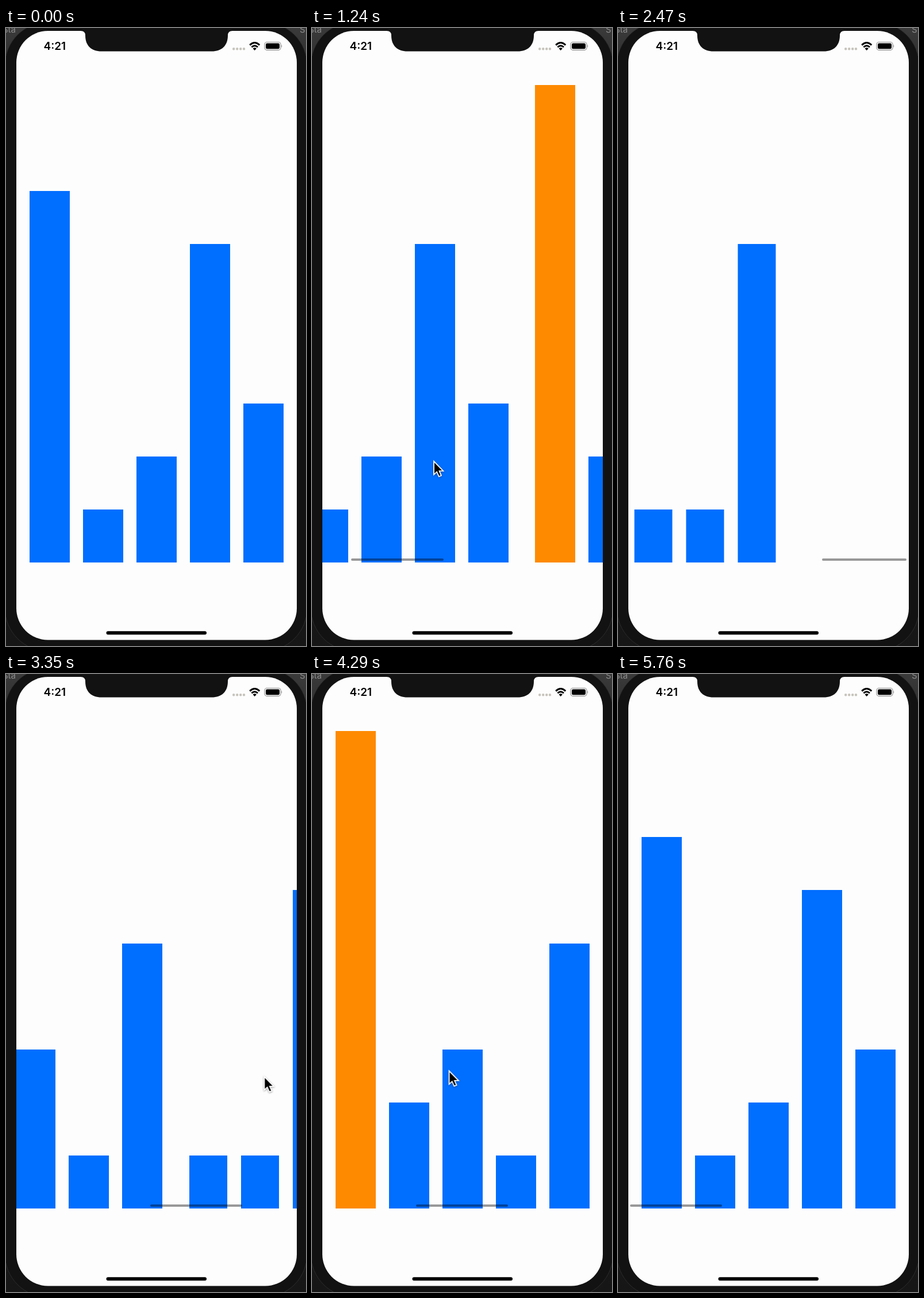
An HTML page that plays this animation: 522 by 1073 pixels, repeating every 5810 ms.

```html
<!DOCTYPE html>
<html lang="en">
<head>
<meta charset="utf-8">
<title>Paged bar chart</title>
<style>
@property --scroll { syntax: "<number>"; inherits: true; initial-value: 0; }

html, body { margin: 0; width: 100%; height: 100%; overflow: hidden; background: #151515; }

.stage {
  position: relative; width: 522px; height: 1073px; overflow: hidden;
  animation: scroll 5810ms linear infinite;
}
.phone { position: absolute; inset: 0; }

.chart { position: absolute; left: 18px; top: 60px; width: 488px; height: 868px; overflow: hidden; }
.pages { display: flex; height: 100%; transform: translateX(calc(var(--scroll) * -1px)); }
.page {
  flex: none; box-sizing: border-box; width: 488px; padding-left: 23px;
  display: flex; align-items: flex-end; gap: 23.5px; --w: 69.5px;
}
.page.short { padding-left: 24px; --w: 66.3px; }
.bar { flex: none; width: var(--w); height: calc(var(--v) * 92.1px); background: #006eff; }
.bar.top { background: #fe8a00; }

.thumb {
  --over: max(0, var(--scroll) - 976);
  position: absolute; top: 920.5px; height: 4px; border-radius: 2px; background: #0006;
  left: calc((21.3 + min(var(--scroll), 976) * .3282 + var(--over)) * 1px);
  width: calc((160.5 - var(--over)) * 1px);
  animation: thumb 5810ms linear infinite;
}
.cursor {
  position: absolute; left: 0; top: 0; overflow: visible;
  filter: drop-shadow(0 1px 1.5px #0006);
  animation: cursor 5810ms ease-in-out infinite;
}

@keyframes scroll {
  0%, 18.24% { --scroll: 0; animation-timing-function: ease-in; }
  22.38% { --scroll: 225; animation-timing-function: cubic-bezier(.2, .6, .3, 1); }
  30.64%, 32.36% { --scroll: 488; animation-timing-function: ease-in; }
  37.52% { --scroll: 830; animation-timing-function: cubic-bezier(.2, .5, .5, 1); }
  42.513% { --scroll: 989.5; animation-timing-function: ease-in-out; }
  48.19%, 52.5% { --scroll: 976; animation-timing-function: ease-in; }
  57.659% { --scroll: 700; }
  58.86% { --scroll: 630; animation-timing-function: cubic-bezier(.2, .6, .3, 1); }
  68.85%, 78.49% { --scroll: 488; animation-timing-function: ease-in-out; }
  84.34% { --scroll: 240; animation-timing-function: cubic-bezier(.2, .6, .3, 1); }
  92.94%, 100% { --scroll: 0; }
}
@keyframes thumb {
  0%, 18.24% { opacity: 0; }
  19.3%, 100% { opacity: 1; }
}
@keyframes cursor {
  0%, 10.5% { transform: translate(540px, 830px); animation-timing-function: ease-out; }
  17.212%, 18.24% { transform: translate(352px, 764px); animation-timing-function: ease-in; }
  22.38% { transform: translate(127px, 742px); }
  24.5% { transform: translate(95px, 738px); }
  31.325%, 32.36% { transform: translate(369px, 724px); animation-timing-function: ease-in; }
  37.52% { transform: translate(27px, 706px); animation-timing-function: linear; }
  39.5%, 45.5% { transform: translate(-40px, 702px); animation-timing-function: ease-out; }
  51.6%, 52.5% { transform: translate(172px, 704px); animation-timing-function: ease-in; }
  57.659% { transform: translate(448px, 697px); animation-timing-function: ease-out; }
  60.5% { transform: translate(486px, 693px); }
  64% { transform: translate(480px, 692px); animation-timing-function: ease-in; }
  73.838% { transform: translate(238px, 687px); animation-timing-function: ease-out; }
  77.5%, 78.49% { transform: translate(182px, 690px); }
  84.34% { transform: translate(430px, 694px); }
  93.5% { transform: translate(418px, 700px); visibility: visible; }
  98.6% { transform: translate(200px, 808px); visibility: visible; animation-timing-function: step-end; }
  98.7%, 100% { transform: translate(200px, 808px); visibility: hidden; }
}
</style>
</head>
<body>
<div class="stage">
  <svg class="phone" width="522" height="1073" viewBox="0 0 522 1073">
    <defs>
      <linearGradient id="desk" x2="0" y2="1">
        <stop stop-color="#3a3a3a"/>
        <stop offset=".1" stop-color="#262626"/>
        <stop offset="1" stop-color="#161616"/>
      </linearGradient>
    </defs>
    <rect width="522" height="1073" fill="url(#desk)"/>
    <g font-family="Inter, sans-serif" font-size="15" fill="#8c8c8c">
      <text x="-6" y="8">Sta</text>
      <text x="511" y="8">S</text>
    </g>
    <rect x="-2" y="-10" width="526" height="1092" rx="75" fill="#121212" stroke="#2c2c2c"/>
    <rect x="18" y="5" width="488" height="1057.5" rx="55" fill="#fdfdfd"/>
    <path d="M130 4V5Q138 5 138 13C138 31 149 40.5 166 40.5H358C375 40.5 386 31 386 13Q386 5 394 5V4Z" fill="#121212"/>

    <text x="65.5" y="38.3" font-family="Inter, sans-serif" font-size="19" font-weight="600">4:21</text>
    <path d="M396.2 36.3h.01m5.99 0h.01m5.99 0h.01m5.79 0h.01" stroke="#c6c3bb" stroke-width="4.4" stroke-linecap="round"/>
    <g fill="none" stroke="#000" stroke-width="2.9">
      <path d="M424.2 29.6Q432.7 21.6 441.2 29.6"/>
      <path d="M427.4 33.2Q432.7 28.2 438 33.2"/>
    </g>
    <path d="M432.7 39l-3.2-3.4q3.2-2.7 6.4 0Z"/>
    <rect x="450" y="24.5" width="28" height="13.8" rx="4" fill="none" stroke="#8f8f8f" stroke-width="1.2"/>
    <rect x="452" y="26.5" width="24" height="9.8" rx="2.4"/>
    <path d="M479.3 29q2 2.4 0 4.8Z" fill="#8f8f8f"/>

    <rect x="174.5" y="1047.2" width="174.5" height="6" rx="3"/>
  </svg>

  <div class="chart">
    <div class="pages">
      <div class="page">
        <div class="bar" style="--v:7"></div>
        <div class="bar" style="--v:1"></div>
        <div class="bar" style="--v:2"></div>
        <div class="bar" style="--v:6"></div>
        <div class="bar" style="--v:3"></div>
      </div>
      <div class="page">
        <div class="bar top" style="--v:9"></div>
        <div class="bar" style="--v:2"></div>
        <div class="bar" style="--v:3"></div>
        <div class="bar" style="--v:1"></div>
        <div class="bar" style="--v:5"></div>
      </div>
      <div class="page short">
        <div class="bar" style="--v:1"></div>
        <div class="bar" style="--v:1"></div>
        <div class="bar" style="--v:6"></div>
      </div>
    </div>
  </div>
  <div class="thumb"></div>

  <svg class="cursor" width="20" height="32" viewBox="0 0 20 32">
    <path d="M1 2V25.2L6.2 20.4L9.8 28.6L14 26.8L10.5 18.8H17.4Z" stroke="#fff" stroke-width="1.8"/>
  </svg>
</div>
</body>
</html>
```
